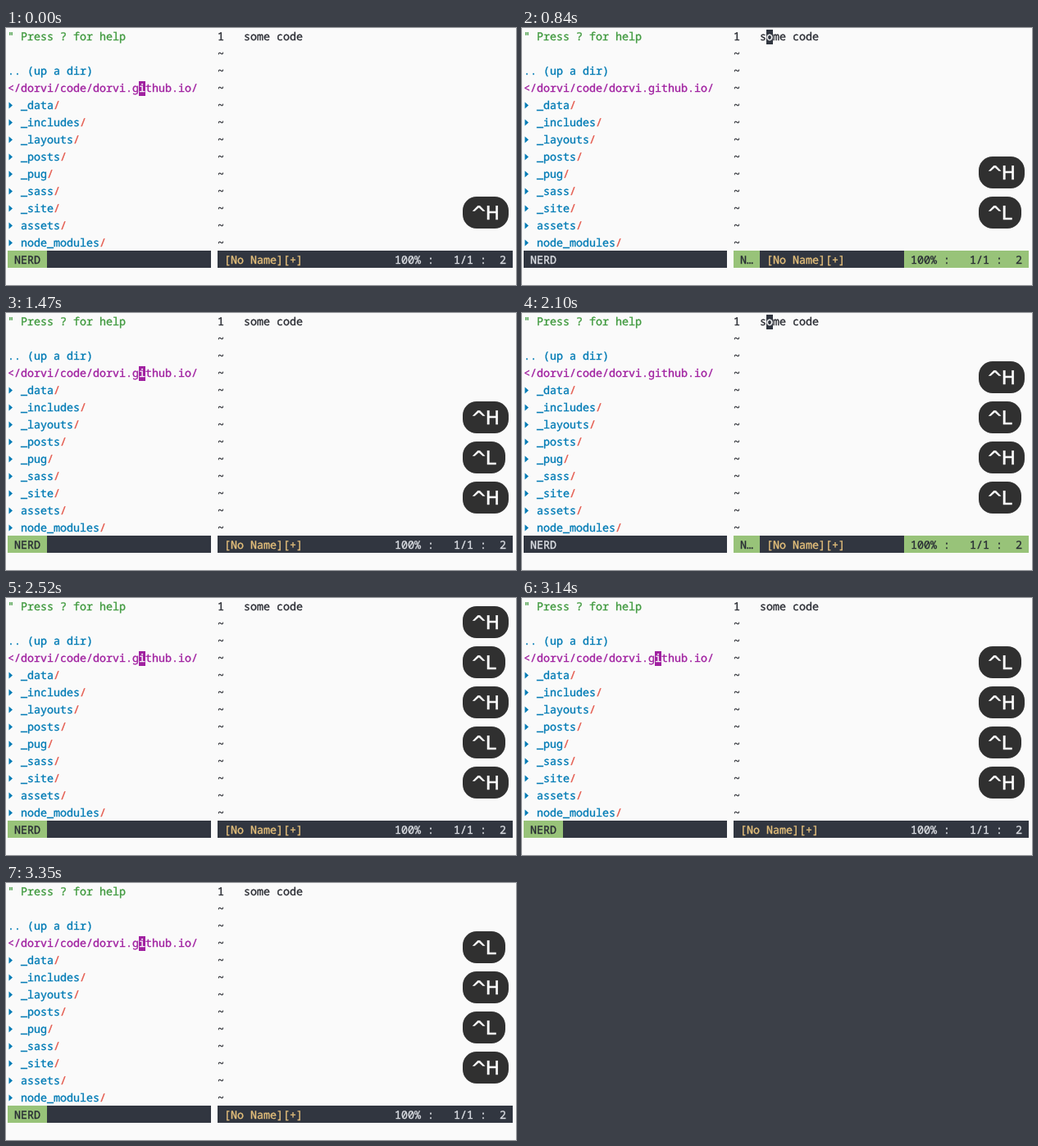
These frames come from a looping animation (622 px wide and 314 px high, 3770 ms). An HTML page:

```html
<!DOCTYPE html>
<html lang="en">
<head>
<meta charset="utf-8">
<title>Pane switching</title>
<style>
  html, body { margin: 0; width: 100%; height: 100%; overflow: hidden; background: #fafafa; }
  svg { display: block; color: #2a2c33; fill: currentColor; }
  text {
    font: 13.333px "Noto Sans Mono", "DejaVu Sans Mono", monospace;
    stroke: currentColor;
    stroke-width: .35px;
    white-space: pre;
    text-rendering: geometricPrecision;
  }
  svg * { fill: currentColor; }
  .bar { color: #313640; }
  .green { color: #98c379; }
  .help { color: #409a3f; }
  .dir { color: #017bb5; }
  .slash { color: #e45649; stroke: currentColor; }
  .path { color: #a020a0; }
  .file { color: #e5c07b; }
  .light { color: #dcdfe4; }
  .dark { color: #282c34; }
  .inverse { color: #fafafa; }
  .key rect { color: #303030; }
  .key text {
    font: 23px "DejaVu Sans", sans-serif;
    letter-spacing: -1.5px;
    color: #fff;
    stroke-width: .5px;
  }

  .left, .right, .stack, .oldest { animation: 3770ms step-end infinite; }
  .left { animation-name: left; }
  .right { animation-name: right; }
  .stack { animation-name: push; }
  .oldest { animation-name: fade; }

  @keyframes left {
    0%, 38.992%, 66.8435%, 100% { visibility: visible; }
    22.2811%, 55.7029% { visibility: hidden; }
  }
  @keyframes right {
    0%, 38.992%, 66.8435%, 100% { visibility: hidden; }
    22.2811%, 55.7029% { visibility: visible; }
  }
  @keyframes push {
    0% { transform: translateY(0); }
    22.2811% { transform: translateY(-49px); }
    38.992% { transform: translateY(-98px); }
    55.7029% { transform: translateY(-147px); }
    66.8435%, 100% { transform: translateY(-196px); }
  }
  @keyframes fade {
    0% { opacity: 1; }
    77.7188% { opacity: .5; }
    83.2891%, 100% { opacity: 0; }
  }
</style>
</head>
<body>
<svg width="622" height="314" viewBox="0 0 622 314">
  <clipPath id="screen"><rect width="622" height="246"/></clipPath>

  <text class="help" x="2" y="15">" Press ? for help</text>
  <text class="dir" x="2" y="57">.. (up a dir)</text>
  <text class="path" x="2" y="78">&lt;/dorvi/code/dorvi.github.io/</text>
  <g id="tree"></g>
  <text x="258" y="15">1   some code</text>
  <g id="tildes"></g>

  <rect class="bar" x="2" y="272" width="248" height="21"/>
  <rect class="bar" x="258" y="272" width="360" height="21"/>

  <g class="left">
    <rect class="path" x="162" y="65" width="8" height="18"/>
    <text class="inverse" x="162" y="78">i</text>
    <rect class="green" x="2" y="272" width="48" height="21"/>
    <text class="dark" x="10" y="288">NERD</text>
    <text class="file" x="266" y="288">[No Name][+]</text>
    <text class="light" x="474" y="288">100% :   1/1 :  2</text>
  </g>

  <g class="right">
    <rect class="bar" x="298" y="2" width="8" height="18"/>
    <text class="inverse" x="298" y="15">o</text>
    <text class="light" x="10" y="288">NERD</text>
    <rect class="green" x="258" y="272" width="32" height="21"/>
    <text class="dark" x="266" y="288">N…</text>
    <text class="file" x="298" y="288">[No Name][+]</text>
    <rect class="green" x="466" y="272" width="152" height="21"/>
    <text class="dark" x="474" y="288">100% :   1/1 :  2</text>
  </g>

  <g clip-path="url(#screen)"><g class="stack" id="keys"></g></g>
</svg>
<script>
  const byId = id => document.getElementById(id);
  const rowY = row => 15 + 21 * row;

  const dirs = ['_data', '_includes', '_layouts', '_posts', '_pug', '_sass', '_site', 'assets', 'node_modules'];
  byId('tree').innerHTML = dirs.map((name, i) => {
    const y = rowY(i + 4);
    return `<path class="dir" d="M3.5 ${y - 8.5}l4.5 4l-4.5 4z"/>
      <text class="dir" x="18" y="${y}">${name}<tspan class="slash">/</tspan></text>`;
  }).join('');

  byId('tildes').innerHTML = Array.from({ length: 12 }, (_, i) =>
    `<text x="258" y="${rowY(i + 1)}">~</text>`).join('');

  byId('keys').innerHTML = [...'HLHLH'].map((key, i) => {
    const top = 206 + 49 * i;
    return `<g class="key${i ? '' : ' oldest'}">
      <rect x="557" y="${top}" width="${key === 'H' ? 56 : 52}" height="39" rx="17"/>
      <text x="567" y="${top + 28}">^${key}</text>
    </g>`;
  }).join('');
</script>
</body>
</html>
```
